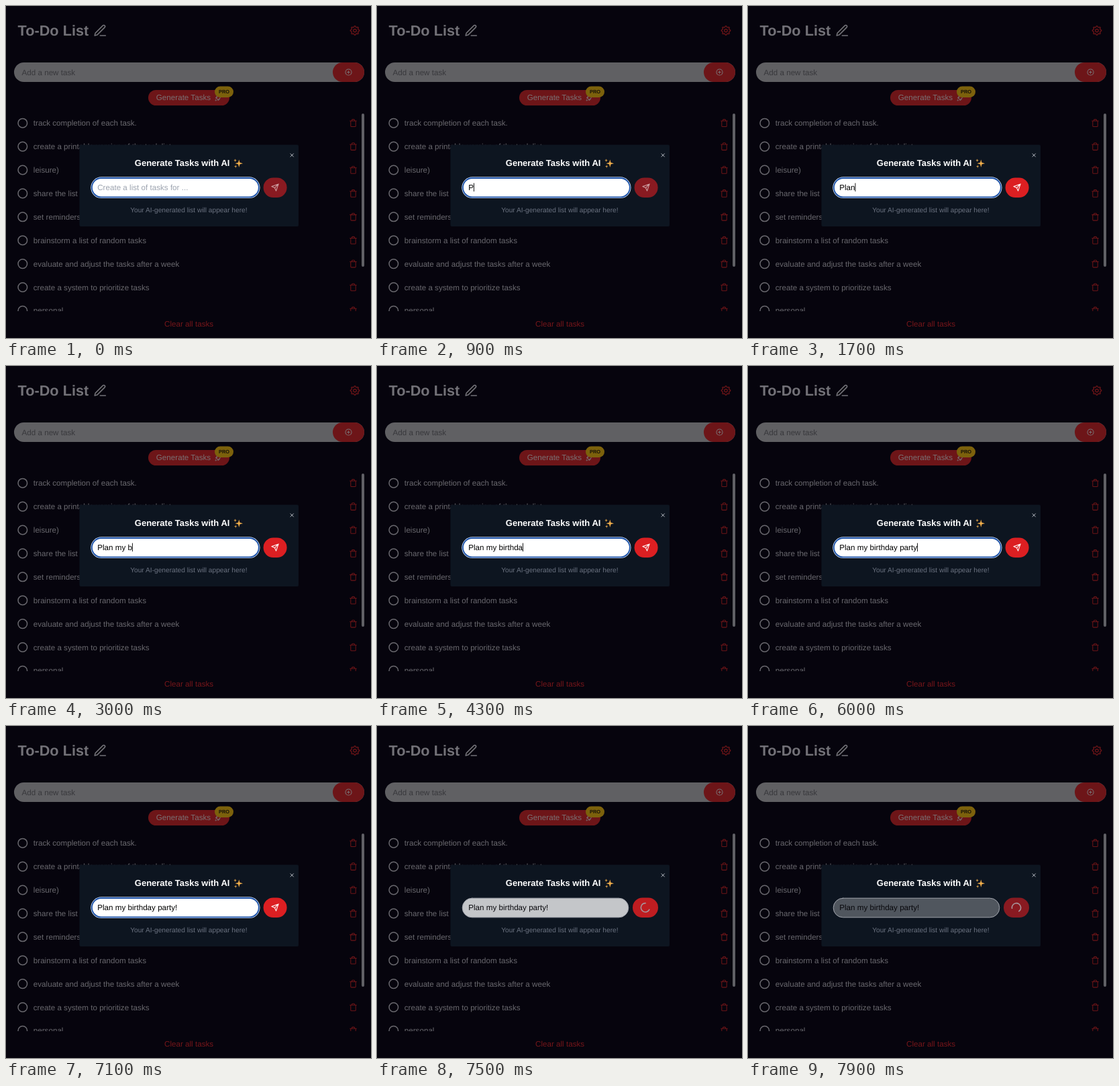
An HTML page with a canvas for the animation above (8 s loop, 544 by 494 pixels).

```html
<!DOCTYPE html>
<html lang="en">
<head>
<meta charset="utf-8">
<title>To-Do List</title>
<style>
  html, body { margin: 0; width: 100%; height: 100%; overflow: hidden; background: #06040d; }
  canvas { display: block; width: 544px; height: 494px; }
</style>
</head>
<body>
<canvas id="stage" width="544" height="494"></canvas>
<script>
const ctx = document.getElementById('stage').getContext('2d');
const LOOP = 8000;
const BODY = 11.65;
const INK = '#69686e';
const RED = '#6d1518';
const SENT = 7500;

const PHRASE = 'Plan my birthday party!';
const KEYS = [900, 1200, 1400, 1600, 2000, 2400, 2700, 2900, 3000, 3300, 3700, 3900,
  4100, 4200, 4300, 4500, 4700, 5000, 5100, 5400, 5700, 6000, 6600];

const ROWS = [
  'track completion of each task.',
  'create a printable version of the task list',
  'leisure)',
  'share the list',
  'set reminders',
  'brainstorm a list of random tasks',
  'evaluate and adjust the tasks after a week',
  'create a system to prioritize tasks',
  'personal'
];

const ICONS = {
  pen: new Path2D('M12 20h9M16.5 3.5a2.1 2.1 0 0 1 3 3L7 19l-4 1 1-4z'),
  trash: new Path2D('M3 6h18M19 6v14a2 2 0 0 1-2 2H7a2 2 0 0 1-2-2V6M8 6V4a2 2 0 0 1 2-2h4a2 2 0 0 1 2 2v2'),
  send: new Path2D('M22 2L11 13M22 2L15 22L11 13L2 9Z'),
  plus: new Path2D('M22 12a10 10 0 1 1-20 0a10 10 0 1 1 20 0M12 8v8M8 12h8'),
  rocket: new Path2D('M9 15l-3-3c2-6 7-10 15-9c1 7-3 12-9 15zM9 12H4l3-5h5M12 15v5l5-3v-5M5 16c-2 1-2 5-2 5s4 0 5-2')
};

const clamp = v => Math.max(0, Math.min(1, v));
const ramp = (t, start, length) => clamp((t - start) / length);

function text(str, x, y, color, size = BODY, weight = 'normal') {
  ctx.font = `${weight} ${size}px "Liberation Sans", Arial, sans-serif`;
  ctx.fillStyle = color;
  ctx.fillText(str, x, y);
}

function box(x, y, w, h, r, fill, stroke, line = 1) {
  ctx.beginPath();
  ctx.roundRect(x, y, w, h, r);
  if (fill) { ctx.fillStyle = fill; ctx.fill(); }
  if (stroke) { ctx.strokeStyle = stroke; ctx.lineWidth = line; ctx.stroke(); }
}

function ring(x, y, r, color, line, from = 0, to = Math.PI * 2) {
  ctx.beginPath();
  ctx.arc(x, y, r, from, to);
  ctx.strokeStyle = color;
  ctx.lineWidth = line;
  ctx.stroke();
}

// Icons live on a 24-unit grid centred on (x, y).
function icon(name, x, y, scale, color, line = 2) {
  ctx.save();
  ctx.translate(x, y);
  ctx.scale(scale, scale);
  ctx.translate(-12, -12);
  ctx.strokeStyle = color;
  ctx.lineWidth = line;
  ctx.stroke(ICONS[name]);
  ctx.restore();
}

function gear(x, y) {
  ctx.beginPath();
  for (let i = 0; i < 32; i++) {
    const a = (i - 0.5) * Math.PI / 16;
    const r = i % 4 < 2 ? 6.7 : 5.2;
    ctx.lineTo(x + r * Math.cos(a), y + r * Math.sin(a));
  }
  ctx.closePath();
  ctx.strokeStyle = RED;
  ctx.lineWidth = 1.3;
  ctx.stroke();
  ring(x, y, 2.2, RED, 1.3);
}

function star(x, y, r) {
  ctx.beginPath();
  for (let i = 0; i < 4; i++) {
    const a = i * Math.PI / 2, b = a + Math.PI / 4;
    ctx.lineTo(x + r * Math.cos(a), y + r * Math.sin(a));
    ctx.lineTo(x + r * 0.3 * Math.cos(b), y + r * 0.3 * Math.sin(b));
  }
  ctx.closePath();
  ctx.fillStyle = '#f3b04c';
  ctx.fill();
}

function page() {
  ctx.fillStyle = '#06040d';
  ctx.fillRect(0, 0, 544, 494);

  text('To-Do List', 17.6, 44, '#737278', 21.7, 'bold');
  icon('pen', 140.3, 36.8, 0.9, '#737278', 1.7);
  gear(520, 36.5);

  box(12, 84, 522, 29, 14.5, '#606063');
  box(487, 84, 47, 29, 14.5, RED);
  text('Add a new task', 23.5, 102.5, '#38383c');
  icon('plus', 510.5, 98.5, 0.46, '#7a7073', 2.2);

  box(212, 125, 121, 23, 11.5, RED);
  text('Generate Tasks', 223.8, 140.2, '#7a7073');
  icon('rocket', 316, 137, 0.44, '#7a7073');
  box(311, 119.5, 28, 16.5, 8.2, '#7c610c');
  text('PRO', 317.1, 130.4, '#130f08', 7.4, 'bold');

  ctx.save();
  ctx.beginPath();
  ctx.rect(0, 155, 544, 299);
  ctx.clip();
  ROWS.forEach((label, i) => {
    const y = 174.2 + i * 34.9;
    ring(24.8, y, 6.8, INK, 1.5);
    text(label, 40.8, y + 4, INK);
    icon('trash', 517.5, y, 0.53, RED);
  });
  ctx.restore();

  box(530, 160, 4, 228, 2, '#606065');
  text('Clear all tasks', 236, 477.4, '#75161a');
}

function caretAlpha(t, typed) {
  if (!typed) return t < 400 ? ramp(t, 50, 100) : 1 - ramp(t, 550, 100);
  return (t - KEYS[typed - 1]) % 1000 < 500 ? 1 : 0;
}

function field(t, typed) {
  const sent = t >= SENT;
  if (sent) {
    const white = 1 - 0.72 * ramp(t, SENT - 50, 150);
    box(127.2, 256.2, 247.6, 28.6, 14.3, `rgba(255,255,255,${white})`, '#a2a5ad');
  } else {
    box(126.3, 254.3, 252.2, 31.8, 15.9, '#d3e0f5');
    box(127.1, 255.1, 250.6, 30.2, 15.1, '#1c52a8');
    box(128.9, 256.9, 247, 26.6, 13.3, '#fff');
  }
  if (!typed) text('Create a list of tasks for ...', 136.2, 274, '#9ca3af');
  else text(PHRASE.slice(0, typed), 136.2, 274, sent ? '#08080c' : '#000');

  if (!sent) {
    ctx.font = `${BODY}px "Liberation Sans", Arial, sans-serif`;
    const x = 136.2 + ctx.measureText(PHRASE.slice(0, typed)).width;
    ctx.globalAlpha = caretAlpha(t, typed);
    ctx.fillStyle = '#000';
    ctx.fillRect(x, 263.5, 0.9, 12.5);
    ctx.globalAlpha = 1;
  }
}

function sendButton(t) {
  if (t >= SENT) {
    ctx.globalAlpha = 1 - 0.4 * ramp(t, SENT - 50, 150);
    box(381, 255.5, 38, 29.5, 14.7, '#dc1f22');
    ctx.globalAlpha = 1;
    const from = (26 + (t - SENT) * 0.36) * Math.PI / 180;
    ring(400, 270.2, 6.6, '#a8949a', 1.6, from, from + 4.28);
    return;
  }
  ctx.globalAlpha = 0.6 + 0.4 * ramp(t, 900, 250);
  box(383.6, 255.5, 35, 29.5, 14.7, '#dc1f22');
  icon('send', 401, 270, 0.51, '#fff', 2.1);
  ctx.globalAlpha = 1;
}

function dialog(t) {
  const typed = KEYS.filter(k => k <= t).length;
  box(109.5, 206.5, 326.5, 121.5, 2, '#0d1520');
  text('Generate Tasks with AI', 191.8, 238.4, '#fff', 13, 'bold');
  star(347.3, 234.2, 5.8);
  star(341.6, 229.8, 2.5);
  star(342.2, 238.8, 2.4);
  ctx.beginPath();
  ctx.moveTo(424, 219.8); ctx.lineTo(428.4, 224.2);
  ctx.moveTo(428.4, 219.8); ctx.lineTo(424, 224.2);
  ctx.strokeStyle = '#b9bdc4';
  ctx.lineWidth = 1;
  ctx.stroke();
  field(t, typed);
  sendButton(t);
  text('Your AI-generated list will appear here!', 185.2, 307.4, '#6b7280', 10.19);
}

ctx.lineJoin = ctx.lineCap = 'round';
ctx.textRendering = 'geometricPrecision';

const start = performance.now();
function draw(now) {
  const t = Math.max(0, now - start) % LOOP;
  page();
  dialog(t);
  requestAnimationFrame(draw);
}
draw(start);
</script>
</body>
</html>
```
